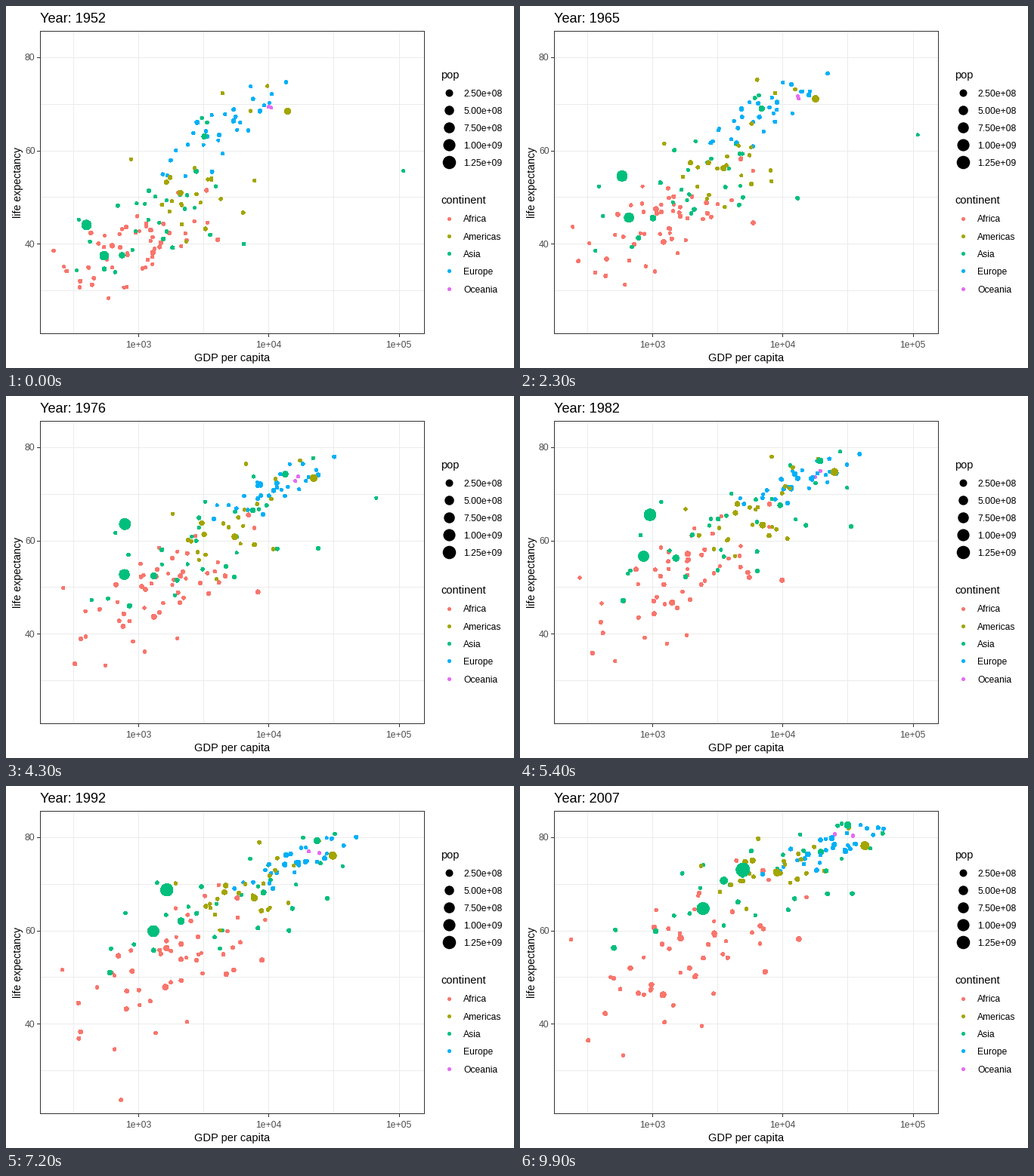
These frames come from a looping animation (672x480 px, 10 s). A matplotlib script:

```python
import numpy as np
import matplotlib.pyplot as plt
from matplotlib.animation import FuncAnimation

W, H, DPI = 672, 480, 96
FRAMES, INTERVAL = 100, 100
FIRST, MIDDLE, LAST = 1952, 1982, 2007
POP_MAX = 1318.7
GROWTH = 1.6

COLOURS = {"Africa": "#F8766D", "Americas": "#A3A500", "Asia": "#00BF7D",
           "Europe": "#00B0F6", "Oceania": "#E76BF3"}

# Continent, count, correlation, then at the first, middle and last year:
# mean log10 gdp, mean life, spread of log10 gdp, spread of life.
CLOUDS = [
    ("Africa", 51, .5, (2.98, 39.1, .30, 5), (3.22, 51.6, .37, 7), (3.28, 54.8, .43, 9)),
    ("Asia", 27, .7, (3.13, 46.5, .30, 9), (3.57, 62.5, .45, 8), (3.80, 70.5, .55, 7.5)),
    ("Oceania", 2, .5, (4.01, 69.3, .01, .2), (4.27, 74.3, .02, .5), (4.47, 80.7, .07, .5)),
    ("Europe", 30, .8, (3.64, 64.4, .25, 6), (4.13, 72.8, .22, 3), (4.35, 77.6, .24, 3)),
    ("Americas", 23, .5, (3.47, 53, .25, 9), (3.78, 66, .25, 6), (3.92, 73.3, .28, 4)),
]

# Standouts that shape the picture: continent, population in millions,
# and a few (year, gdp, life) stops.
STANDOUTS = [
    ("Africa", 5.5, (1952, 493, 40), (1987, 848, 44), (1992, 737, 23.6), (2007, 863, 46.2)),
    ("Asia", 850, (1952, 400, 44), (1960, 530, 48), (1970, 653, 61.6),
     (1982, 962, 65.5), (1992, 1656, 68.7), (2007, 4959, 73)),
    ("Asia", 643, (1952, 547, 37.4), (1982, 856, 56.6), (2007, 2452, 64.7)),
    ("Asia", 137, (1952, 750, 37.5), (1982, 1517, 56.2), (2007, 3541, 70.7)),
    ("Asia", 105, (1952, 3217, 63), (1982, 19384, 77.1), (2007, 31656, 82.6)),
    ("Asia", 1, (1952, 108382, 55.6), (1972, 109348, 67.7),
     (1982, 31354, 71.3), (2007, 47307, 77.6)),
    ("Asia", 11, (1952, 6460, 39.9), (1982, 33693, 63), (2007, 21655, 72.8)),
    ("Americas", 112, (1952, 2109, 50.9), (1982, 7031, 63.3), (2007, 9066, 72.4)),
    ("Americas", 210, (1952, 13990, 68.4), (1982, 25010, 74.7), (2007, 42952, 78.2)),
]

rng = np.random.default_rng(7)
years = np.linspace(FIRST, LAST, FRAMES)
u = np.linspace(0, 1, FRAMES)
surveys = np.arange(FIRST, LAST + 1, 5)


def scores(n, keep=.985):
    """Standard scores that wander slowly from one survey to the next."""
    z = [rng.normal(size=n)]
    for _ in surveys[1:]:
        z.append(keep * z[-1] + np.sqrt(1 - keep ** 2) * rng.normal(size=n))
    z = np.array(z)
    z = (z - z.mean(1, keepdims=True)) / z.std(1, keepdims=True)
    return np.clip(z, -2.1, 2.1)


def soft_cap(life, cap, blend=1.5):
    return cap - blend * np.log1p(np.exp((cap - life) / blend))


def cloud(n, corr, *poses):
    gdp, life, gdp_sd, life_sd = (
        np.interp(surveys, (FIRST, MIDDLE, LAST), v)[:, None] for v in zip(*poses))
    wealth = scores(n)
    health = corr * wealth + np.sqrt(1 - corr ** 2) * scores(n)
    cap = np.linspace(75, 83.5, len(surveys))[:, None]
    x, y = gdp + gdp_sd * wealth, soft_cap(life + life_sd * health, cap)
    for k in range(n):
        yield np.interp(years, surveys, x[:, k]), np.interp(years, surveys, y[:, k])


def to_px(log_gdp, life):
    return 175 + 172.3 * (log_gdp - 3), 68 + 6.175 * (80 - life)


def area(size):
    """Marker area in square points for a point size in mm."""
    return ((2.845 * size + .9) * 72 / DPI) ** 2


def pop_size(pop):
    return 1 + 5 * np.sqrt(np.clip(pop / POP_MAX, 0, 1))


spots, areas, colours = [], [], []


def add_bubble(continent, pop, log_gdp, life):
    spots.append(np.stack(to_px(log_gdp, life), -1))
    areas.append(area(pop_size(pop * GROWTH ** (2 * u - 1))))
    colours.append(COLOURS[continent])


for continent, n, *shape in CLOUDS:
    for log_gdp, life in cloud(n, *shape):
        add_bubble(continent, min(rng.lognormal(1.8, 1.2), 75), log_gdp, life)
for continent, pop, *stops in STANDOUTS:
    when, gdp, life = zip(*stops)
    add_bubble(continent, pop, np.interp(years, when, np.log10(gdp)),
               np.interp(years, when, life))
spots, areas = np.array(spots), np.array(areas)

plt.rcParams["font.family"] = "Liberation Sans"
fig = plt.figure(figsize=(W / DPI, H / DPI), dpi=DPI, facecolor="white")
ax = fig.add_axes([0, 0, 1, 1])
ax.set(xlim=(0, W), ylim=(H, 0))
ax.axis("off")

LEFT, RIGHT, TOP, BOTTOM = 45, 553, 33, 434
GREY = "#4D4D4D"


def line(xs, ys, colour, z=1):
    ax.plot(np.round(xs), np.round(ys), color=colour, lw=72 / DPI,
            antialiased=False, zorder=z, solid_capstyle="butt")


def label(x, y, s, size=9.1, colour="black", **kw):
    kw.setdefault("va", "center_baseline")
    return ax.text(x, y, s, fontsize=size, color=colour, **kw)


def dots(x, y, s, colour, z=3):
    return ax.scatter(x, y, s=s, c=colour, linewidths=0, antialiased=False, zorder=z)


for exp in np.arange(2.5, 5.1, .5):
    x = to_px(exp, 0)[0]
    line([x, x], [TOP, BOTTOM], "#EBEBEB")
    if exp == int(exp):
        line([x, x], [BOTTOM, BOTTOM + 4], "#333333")
        label(x, 448.5, f"1e+0{int(exp)}", colour=GREY, ha="center")
for life in range(30, 90, 10):
    y = to_px(0, life)[1]
    line([LEFT, RIGHT], [y, y], "#EBEBEB")
    if life in (40, 60, 80):
        line([LEFT - 4, LEFT], [y, y], "#333333")
        label(38.5, y, str(life), colour=GREY, ha="right")
line([LEFT, RIGHT, RIGHT, LEFT, LEFT], [TOP, TOP, BOTTOM, BOTTOM, TOP], "#333333", 5)

label(299, 471, "GDP per capita", 11, ha="center", va="baseline")
label(23, 233.5, "life expectancy", 10.6, rotation=90, ha="right", va="center")
title = label(45, 22, "", 13.6, va="baseline")

label(575, 96, "pop", 11, va="baseline")
for i, pop in enumerate(range(250, 1251, 250)):
    y = 115 + 23 * i
    dots(586, y, area(pop_size(pop)), "black")
    label(605, y + .5, f"{pop * 1e6:.2e}")
label(575, 262, "continent", 11, va="baseline")
for i, (name, colour) in enumerate(COLOURS.items()):
    y = 281.5 + 23.25 * i
    dots(586, y, area(1.5), colour)
    label(605, y + .5, name)

bubbles = dots(spots[:, 0, 0], spots[:, 0, 1], areas[:, 0], colours)


def draw(i):
    bubbles.set_offsets(spots[:, i])
    bubbles.set_sizes(areas[:, i])
    title.set_text(f"Year: {round(years[i])}")
    return bubbles, title


anim = FuncAnimation(fig, draw, frames=FRAMES, interval=INTERVAL,
                     repeat=True, repeat_delay=0)
plt.show()
```
